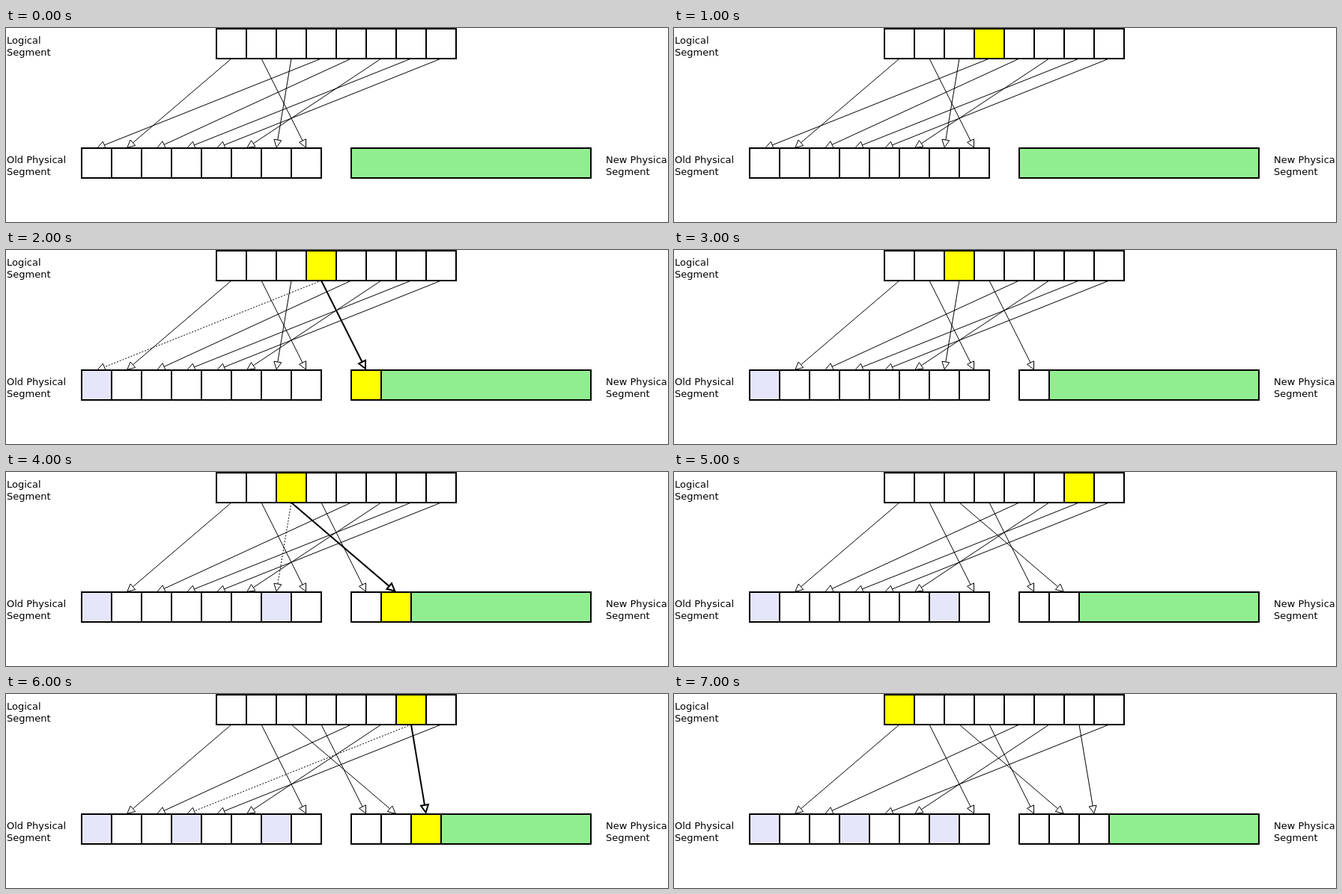
An HTML page that plays this animation: 884 by 260 pixels, repeating every 8000 ms.

```html
<!DOCTYPE html>
<html lang="en">
<head>
<meta charset="utf-8">
<title>Segment remapping</title>
<style>
  html, body { margin: 0; width: 100%; height: 100%; overflow: hidden; background: #fff; }
  svg { display: block; }
  text { font: 13px "DejaVu Sans", sans-serif; }
</style>
</head>
<body>
<svg width="884" height="260" viewBox="0 0 884 260">
  <g id="arrows" stroke="#000" fill="#fff"></g>
  <g id="cells" stroke="#000" stroke-width="2"></g>
  <text x="1" y="21">Logical</text>
  <text x="1" y="37">Segment</text>
  <text x="1" y="181">Old Physical</text>
  <text x="1" y="197">Segment</text>
  <text x="801" y="181">New Physical</text>
  <text x="801" y="197">Segment</text>
</svg>
<script>
const SIZE = 40, STEP_MS = 1000, STEPS = 8;
const LOGICAL_X = 281, OLD_X = 101, NEW_X = 461, TOP = 1, BOTTOM = 161;
const WHITE = '#fff', ACTIVE = '#ff0', FREED = '#e6e6fa', FREE = '#90ee90';
const oldSlot = [1, 7, 6, 0, 2, 5, 3, 4]; // old cell of each logical cell
const writes = [3, 2, 6, 0];              // order in which logical cells are rewritten

const arrowLayer = document.getElementById('arrows');
const cellLayer = document.getElementById('cells');

const rect = (x, y, w, fill) =>
  `<rect x="${x}" y="${y}" width="${w}" height="${SIZE}" fill="${fill}"/>`;

const row = (x, y, fills) => fills.map((f, i) => rect(x + i * SIZE, y, SIZE, f)).join('');

function arrow(from, rowX, slot, width = 1, dotted = false) {
  const x1 = LOGICAL_X + (from + 0.5) * SIZE, y1 = TOP + SIZE;
  const x2 = rowX + (slot + 0.5) * SIZE, y2 = BOTTOM;
  const len = Math.hypot(x2 - x1, y2 - y1);
  const ux = (x2 - x1) / len, uy = (y2 - y1) / len;
  const back = width * Math.sqrt(5) / 2; // keeps the mitred tip on the end point
  const tx = x2 - ux * back, ty = y2 - uy * back;
  const bx = tx - ux * 10, by = ty - uy * 10;
  const px = -uy * 5, py = ux * 5;
  const dash = dotted ? ' stroke-dasharray="2 2"' : '';
  return `<g stroke-width="${width}"><path d="M${x1} ${y1}L${bx} ${by}"${dash}/>` +
    `<path d="M${tx} ${ty}L${bx + px} ${by + py}L${bx - px} ${by - py}Z"/></g>`;
}

function draw(step) {
  const turn = step ? Math.floor((step - 1) / 2) : -1;
  const copying = step > 0 && step % 2 === 0;
  const done = Math.max(turn, 0);
  const logical = Array(8).fill(WHITE), old = Array(8).fill(WHITE);
  const fresh = Array(done).fill(WHITE);

  if (turn >= 0) logical[writes[turn]] = ACTIVE;
  if (copying) fresh.push(ACTIVE);
  writes.slice(0, fresh.length).forEach(i => { old[oldSlot[i]] = FREED; });

  let arrows = '';
  oldSlot.forEach((slot, i) => {
    const place = writes.indexOf(i);
    if (place >= 0 && place < done) {
      arrows += arrow(i, NEW_X, place);
    } else {
      const moving = copying && place === turn;
      arrows += arrow(i, OLD_X, slot, 1, moving);
      if (moving) arrows += arrow(i, NEW_X, place, 2);
    }
  });

  arrowLayer.innerHTML = arrows;
  cellLayer.innerHTML = row(LOGICAL_X, TOP, logical) + row(OLD_X, BOTTOM, old) +
    rect(NEW_X, BOTTOM, 8 * SIZE, FREE) + row(NEW_X, BOTTOM, fresh);
}

const start = performance.now();
let shown = 0;
draw(0);

function tick() {
  const step = Math.floor((performance.now() - start) / STEP_MS) % STEPS;
  if (step !== shown) draw(shown = step);
  requestAnimationFrame(tick);
}
requestAnimationFrame(tick);
</script>
</body>
</html>
```
